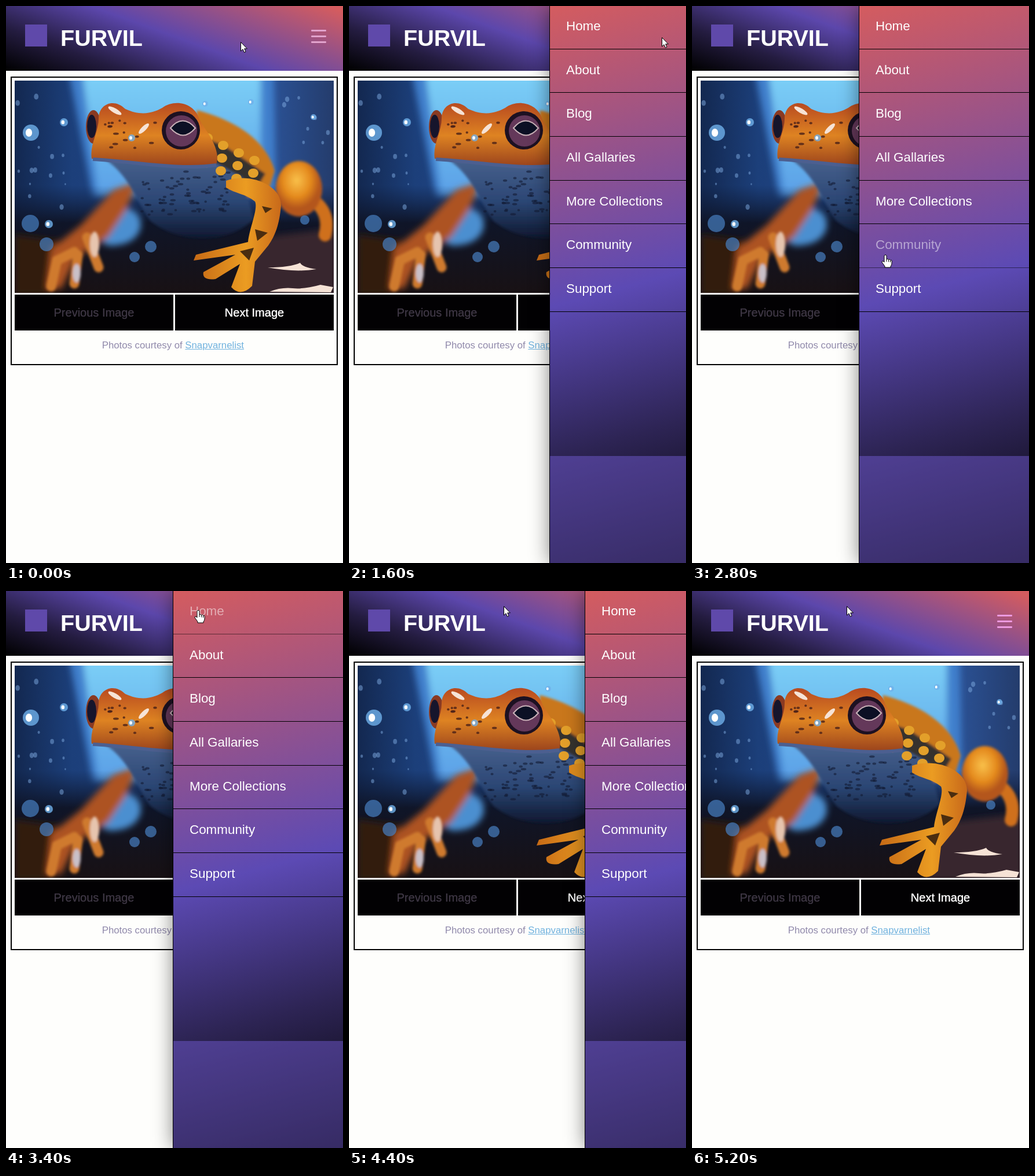
Animation, 582 px wide and 963 px high, one loop 5400 ms. Source, as an HTML page:

```html
<!DOCTYPE html>
<html lang="en">
<head>
<meta charset="utf-8">
<title>Photo gallery</title>
<style>
html, body { margin: 0; width: 100%; height: 100%; overflow: hidden; background: #fefefc; }
body { position: relative; font-family: "Liberation Sans", Arial, sans-serif; }
body * { box-sizing: border-box; }
.abs { position: absolute; white-space: nowrap; }
header {
  left: 0; top: 0; width: 582px; height: 112px;
  background: linear-gradient(20deg, #000 0%, #241c40 23%, #5c47ac 51%, #d45c5f 97%);
}
.logo { left: 33px; top: 32px; width: 38px; height: 38px; background: #5f49aa; }
h1 { left: 94px; top: 30px; margin: 0; font-size: 39.5px; line-height: 51px; color: #fff; }
#bars { left: 527px; top: 41px; width: 26px; height: 23px; }
#bars i { position: absolute; left: 0; width: 26px; height: 2.6px; border-radius: 1.3px; background: currentColor; }
.card { left: 8px; top: 122px; width: 565px; height: 499px; border: 2px solid #000; }
#photo { left: 15px; top: 129px; width: 551px; height: 367px; }
.btn {
  top: 499px; width: 274px; height: 62px; background: #020103; color: #fff;
  font-size: 20px; line-height: 62px; text-align: center; text-shadow: 0 0 1px currentColor;
}
.credit { left: 165.7px; top: 577px; font-size: 16.8px; line-height: 20px; color: #9089ab; }
.credit u { color: #70b2de; }
#menu {
  left: 288px; top: 0; width: 294px; height: 963px;
  border-left: 1px solid #000;
  background: linear-gradient(165deg, #d45c5f 0%, #5c4ab4 50%, #2d2454 75%, #000 100%);
  box-shadow: 0 0 32px rgba(0, 0, 0, .48);
}
#menu ul { position: absolute; left: 0; top: -1px; width: 293px; margin: 0; padding: 0; list-style: none; }
#menu li {
  height: 75.67px; padding-left: 28px; border-bottom: 1px solid #000;
  font-size: 22.4px; line-height: 72.6px; color: #fff;
}
.emblem { left: 0; top: 778px; width: 293px; height: 293px; background: rgba(120, 96, 222, .45); }
.cursor { left: 0; top: 0; width: 20px; height: 26px; overflow: visible; }
</style>
</head>
<body>
<header class="abs">
  <div class="abs logo"></div>
  <h1 class="abs">FURVIL</h1>
  <div class="abs" id="bars"><i style="top:0"></i><i style="top:10px"></i><i style="top:20px"></i></div>
</header>

<div class="abs card"></div>
<svg class="abs" id="photo" viewBox="15 129 551 367">
  <defs>
    <linearGradient id="night"><stop offset="0" stop-color="#132850"/><stop offset=".18" stop-color="#1c3f7a"/><stop offset=".8" stop-color="#2b5296"/><stop offset="1" stop-color="#243c6c"/></linearGradient>
    <linearGradient id="sky" x1="0" x2="0" y1="0" y2="1"><stop offset="0" stop-color="#7fd4f8"/><stop offset="1" stop-color="#5a9fe6"/></linearGradient>
    <linearGradient id="floor" x1="0" x2="0" y1="0" y2="1"><stop offset="0" stop-color="#0d1a38" stop-opacity="0"/><stop offset=".35" stop-color="#0f1528"/><stop offset="1" stop-color="#181114"/></linearGradient>
    <linearGradient id="belly" x1="0" x2="0" y1="0" y2="1"><stop offset="0" stop-color="#48628e"/><stop offset=".55" stop-color="#2b4674"/><stop offset="1" stop-color="#0f1830"/></linearGradient>
    <linearGradient id="skin" x1="0" x2="0" y1="0" y2="1"><stop offset="0" stop-color="#b84a20"/><stop offset=".5" stop-color="#de8322"/><stop offset="1" stop-color="#97401c"/></linearGradient>
    <linearGradient id="limb"><stop offset="0" stop-color="#c66a16"/><stop offset=".6" stop-color="#eb9c22"/><stop offset="1" stop-color="#c8691a"/></linearGradient>
    <radialGradient id="thigh" cx=".45" cy=".35"><stop offset="0" stop-color="#f9c04a"/><stop offset=".6" stop-color="#e48a1e"/><stop offset="1" stop-color="#b4561c"/></radialGradient>
    <filter id="soft" x="-30%" y="-30%" width="160%" height="160%"><feGaussianBlur stdDeviation="6"/></filter>
    <filter id="mild" x="-20%" y="-20%" width="140%" height="140%"><feGaussianBlur stdDeviation="2"/></filter>
  </defs>
  <rect x="15" y="129" width="551" height="367" fill="url(#night)"/>
  <g filter="url(#soft)">
    <path d="M106 100H462L466 330H150Z" fill="#3f7fcc"/>
    <path d="M130 100H440V330H160Z" fill="url(#sky)"/>
  </g>
  <rect x="15" y="310" width="551" height="186" fill="url(#floor)"/>
  <g filter="url(#soft)">
    <path d="M15 395L90 405 70 500H15Z" fill="#311b10"/>
    <path d="M440 400L570 385V500H400Z" fill="#38282e"/>
    <path d="M190 350C240 340 250 400 200 412S160 390 190 350Z" fill="#4c8fd0"/>
    <path d="M226 304L186 318 128 380 78 420 70 490 96 488 120 436 176 400 208 352Z" fill="#ad5220"/>
  </g>
  <g filter="url(#mild)">
    <path d="M140 400L160 452M118 425L88 440L78 485M124 430L118 480" fill="none" stroke="#cf7a2e" stroke-width="17" stroke-linecap="round"/>
    <ellipse cx="153" cy="412" rx="8" ry="22" fill="#e6c4ae"/>
    <ellipse cx="122" cy="462" rx="7" ry="16" fill="#c9c0c8"/>
    <path d="M536 340Q560 362 551 396" fill="none" stroke="#cf6f1c" stroke-width="22" stroke-linecap="round"/>
    <ellipse cx="506" cy="316" rx="40" ry="48" fill="url(#thigh)"/>
    <path d="M330 180C390 196 448 228 464 285L450 330 350 330 320 250Z" fill="#c9771f"/>
    <path d="M330 225L375 240 448 290 430 320 340 310Z" fill="#35302e"/>
    <path d="M172 266C215 295 226 340 250 372C300 412 385 412 428 368L408 296 345 262Z" fill="url(#belly)"/>
  </g>
  <g id="spots"></g>
  <ellipse cx="151" cy="209" rx="13" ry="29" fill="#8a3a22"/>
  <ellipse cx="148" cy="208" rx="8" ry="20" fill="#16152c"/>
  <path d="M148 264C144 240 160 218 160 194C160 170 186 158 206 178C232 190 252 186 270 176C292 160 326 168 334 196C346 218 372 246 363 274C310 290 215 268 148 264Z" fill="url(#skin)"/>
  <g id="freckles"></g>
  <path d="M150 265C215 268 300 285 363 275" fill="none" stroke="#4c5f90" stroke-width="6"/>
  <circle cx="302" cy="215" r="33" fill="#1d1122"/>
  <circle cx="303" cy="216" r="27" fill="#64385a"/>
  <path d="M284 211Q305 186 327 211Q306 236 284 211Z" fill="#0c1024" stroke="#c9b2b8" stroke-width="2"/>
  <path d="M380 302C420 288 475 308 475 345C472 380 464 398 453 414L430 442 425 484Q405 504 389 486L404 446 362 472Q338 475 341 460L396 430 324 440 328 430 418 408C420 385 436 350 430 338C415 325 395 324 380 314Z" fill="url(#limb)"/>
  <path d="M442 346l18 4-12 8zM430 386l22 6-18 14zM404 424l24-6-8 22z" fill="#4a2d10"/>
  <g fill="#f6e3d6">
    <ellipse cx="188" cy="181" rx="13" ry="4" transform="rotate(30 188 181)"/>
    <ellipse cx="238" cy="212" rx="12" ry="4" transform="rotate(-45 238 212)"/>
    <path d="M452 452Q490 452 508 444Q512 452 536 455Q500 461 452 452ZM455 494q20-8 40-6t48-6l22 4-4 9z"/>
  </g>
  <g id="drops"></g>
</svg>

<div class="abs btn" style="left:15px;color:#3d3643">Previous Image</div>
<div class="abs btn" style="left:292px">Next Image</div>
<div class="abs credit">Photos courtesy of <u>Snapvarnelist</u></div>

<nav class="abs" id="menu">
  <ul>
    <li>Home</li><li>About</li><li>Blog</li><li>All Gallaries</li>
    <li>More Collections</li><li>Community</li><li>Support</li>
  </ul>
  <div class="abs emblem"></div>
</nav>

<svg class="abs cursor" id="arrow"><path d="M.5 .5V16L4 12.7 6.4 18.2 9 17.1 6.7 11.8H11.4Z" fill="#fff" stroke="#000"/></svg>
<svg class="abs cursor" id="hand"><path d="M-2 1.5Q0-1 2 1.5V8Q4 6.5 5.5 8.5 7.5 7.3 8.5 9.3 11 8.6 11 11V15Q11 18 9 20V22H-1V20L-6 13Q-6 10.5-4 11L-2 13Z" fill="#fff" stroke="#000"/><path d="M2 8v4M5.5 9v3.5M8.5 10v3" stroke="#000"/></svg>

<script>
const LOOP = 5400, STEP = 200, TRAVEL = 330, SLIDE = 769;
const OPEN_AT = 1036, CLOSE_AT = 4088, ITEM = 75.67;
const el = id => document.getElementById(id);
const items = [...document.querySelectorAll('#menu li')];

// Pointer path: time, x, y
const path = [
  [0, 405, 62], [200, 405, 62], [800, 536, 55], [1000, 540, 54], [2000, 540, 54],
  [2400, 380, 150], [2800, 334, 430], [3000, 332, 490], [3400, 332, 33],
  [3600, 302, 20], [3800, 267, 26], [LOOP, 267, 26]
];

const smooth = x => { x = Math.min(1, Math.max(0, x)); return x * x * (3 - 2 * x); };

function pointer(t) {
  const i = path.findIndex(p => p[0] > t);
  const [a, b] = [path[i - 1], path[i]];
  const k = (t - a[0]) / (b[0] - a[0]);
  return [a[1] + (b[1] - a[1]) * k, a[2] + (b[2] - a[2]) * k];
}

function paintDetails() {
  let seed = 7;
  const rnd = () => (seed = seed * 16807 % 2147483647) / 2147483647;
  const dot = (x, y, rx, ry, fill, opacity = 1) =>
    `<ellipse cx="${x}" cy="${y}" rx="${rx}" ry="${ry}" fill="${fill}" opacity="${opacity}"/>`;
  let spots = '', freckles = '', drops = '';
  for (let i = 0; i < 70; i++)
    spots += dot(235 + rnd() * 155, 286 + rnd() * 75, 2 + rnd() * 3, 2, '#131a34', .6);
  for (let i = 0; i < 12; i++) {
    const u = i % 4, v = Math.floor(i / 4);
    spots += dot(348 + u * 27 - v * 2, 228 + u * 13 + v * 22, 9, 8, '#e3a02a');
  }
  for (let i = 0; i < 16; i++)
    freckles += dot(168 + rnd() * 90, 198 + rnd() * 50, 2 + rnd() * 3, 2, '#4a2018', .8);
  for (let i = 0; i < 22; i++) {
    const r = 1 + rnd() * 3, right = i % 3 === 0;
    drops += dot((right ? 470 : 20) + rnd() * 90, 140 + rnd() * (right ? 100 : 210), r, r * 1.3, '#7ea9e0', .5);
  }
  for (const [x, y, r] of [[43, 219, 14], [100, 201, 7], [344, 169, 5], [423, 166, 5], [531, 192, 5], [217, 228, 6], [74, 377, 7]])
    drops += dot(x, y, r, r, '#6fb0ea', .8) + dot(x - r / 4, y, r / 2.5, r / 2, '#fff');
  for (const [x, y, r] of [[42, 376, 15], [70, 412, 12], [222, 434, 9], [250, 416, 10], [516, 370, 8]])
    drops += dot(x, y, r, r, '#477fc0', .7);
  el('spots').innerHTML = spots;
  el('freckles').innerHTML = freckles;
  el('drops').innerHTML = drops;
}

function draw(t) {
  const shift = TRAVEL * (1 - smooth((t - OPEN_AT) / SLIDE) + smooth((t - CLOSE_AT) / SLIDE));
  el('menu').style.transform = `translateX(${Math.round(shift)}px)`;
  el('menu').style.visibility = shift >= TRAVEL ? 'hidden' : 'visible';

  const [x, y] = pointer(t);
  const hover = t > 2000 && t < CLOSE_AT && x > 288 ? Math.floor((y + 1) / ITEM) : -1;
  items.forEach((item, i) => item.style.opacity = i === hover ? .5 : 1);
  el('bars').style.color = t < 800 ? '#e2a3cd' : '#ec9ae0';

  const hand = hover >= 0;
  el('hand').style.display = hand ? 'block' : 'none';
  el('arrow').style.display = hand ? 'none' : 'block';
  el(hand ? 'hand' : 'arrow').style.transform = `translate(${Math.round(x)}px, ${Math.round(y)}px)`;
}

const start = performance.now();
function tick() {
  const t = (performance.now() - start) % LOOP;
  draw(Math.floor(t / STEP) * STEP);
  requestAnimationFrame(tick);
}
paintDetails();
tick();
</script>
</body>
</html>
```
